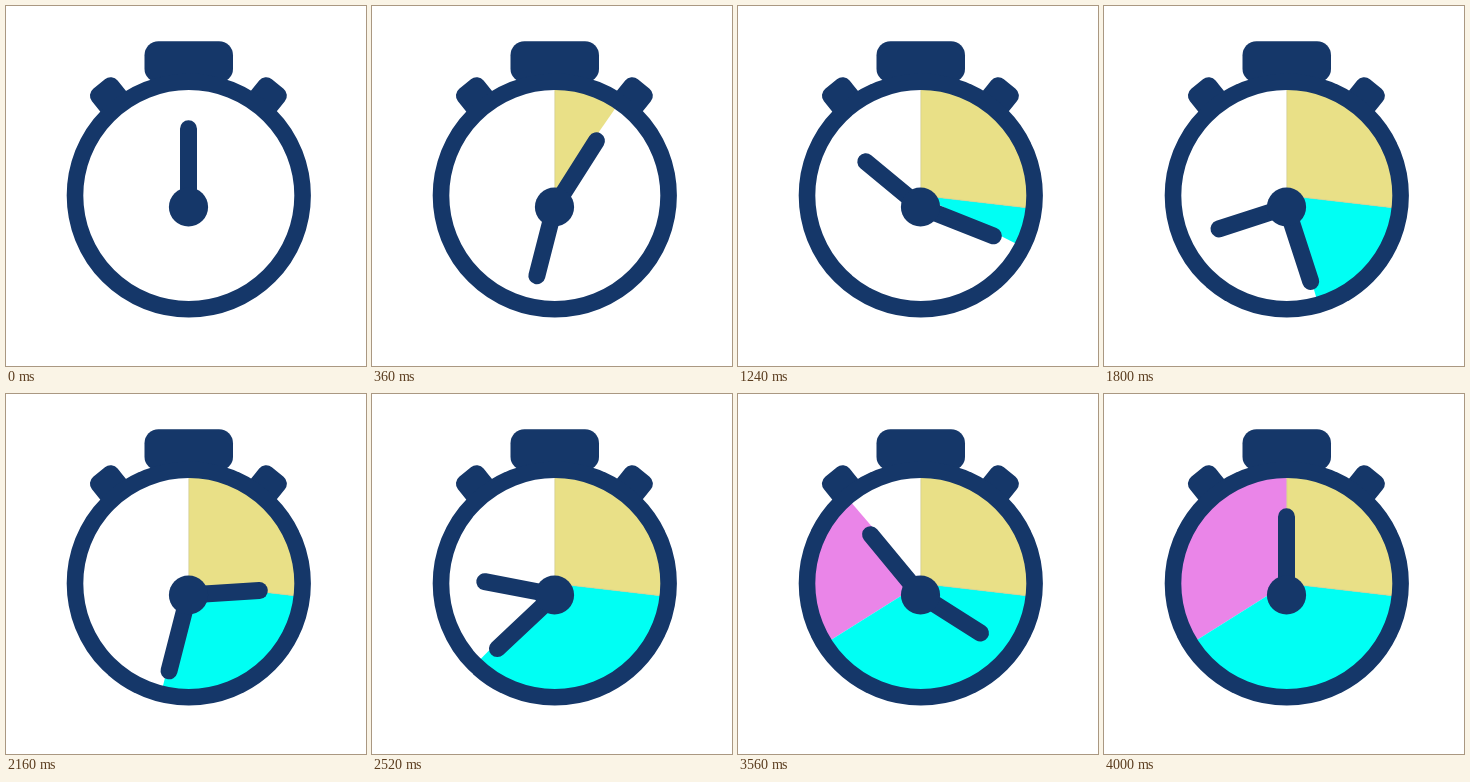
Recreate the animation shown at these times as an HTML page. Size 360 by 360 pixels, loop 4.08 s.

```html
<!DOCTYPE html>
<html lang="en">
<head>
<meta charset="utf-8">
<title>Stopwatch</title>
<style>
  html, body { margin: 0; width: 100%; height: 100%; overflow: hidden; background: #fff; }
  svg { display: block; width: 100vw; height: 100vh; }
  .navy { fill: #153769; }
  .hand { stroke: #153769; stroke-width: 17; stroke-linecap: round; }
</style>
</head>
<body>
<svg viewBox="0 0 360 360">
  <path id="pink" fill="#ea85e8"/>
  <path id="cyan" fill="#00fff4"/>
  <path id="yellow" fill="#e9e087"/>
  <path id="edge" fill="none" stroke="#c9c48f" stroke-width="0.8" stroke-opacity="0.7"/>
  <g class="navy">
    <rect x="138.5" y="35.2" width="88.5" height="41.5" rx="14"/>
    <rect x="-16.5" y="-17" width="33" height="34" rx="9" transform="translate(103.8 91.2) rotate(-39)"/>
    <rect x="-16.5" y="-17" width="33" height="34" rx="9" transform="translate(261 91.2) rotate(39)"/>
  </g>
  <circle cx="182.8" cy="189.5" r="113.8" fill="none" stroke="#153769" stroke-width="16.6"/>
  <g transform="translate(182.5 201)">
    <line id="fast" class="hand" y2="-71"/>
    <line id="slow" class="hand" y2="-78.3"/>
    <circle class="navy" r="19.6"/>
  </g>
</svg>
<script>
const STEP = 40, LAST_STEP = 100, LOOP = 4080;
const CX = 182.8, CY = 189.5, RADIUS = 108;

// Each sector opens from one angle to the next; "show" is when it becomes visible.
const sectors = [
  { id: "yellow", from: 0,     to: 96.6,  start: 0,    end: 1000, show: 0 },
  { id: "cyan",   from: 96.6,  to: 237.9, start: 1000, end: 2680, show: 1000 },
  { id: "pink",   from: 237.9, to: 360,   start: 2680, end: 4000, show: 3000 }
];

const byId = id => document.getElementById(id);
const clamp = x => Math.min(1, Math.max(0, x));

function rim(angle) {
  const a = angle * Math.PI / 180;
  return `${CX + RADIUS * Math.sin(a)} ${CY - RADIUS * Math.cos(a)}`;
}

function wedge(from, to) {
  if (to <= from) return "";
  return `M${CX} ${CY}L${rim(from)}A${RADIUS} ${RADIUS} 0 ${to - from > 180 ? 1 : 0} 1 ${rim(to)}Z`;
}

function render(time) {
  const step = Math.min(LAST_STEP, Math.floor((time % LOOP) / STEP));
  const t = step * STEP;
  const turn = step / LAST_STEP * 360;

  byId("slow").setAttribute("transform", `rotate(${turn})`);
  byId("fast").setAttribute("transform", `rotate(${turn * 6})`);

  for (const s of sectors) {
    const p = t < s.show ? 0 : clamp((t - s.start) / (s.end - s.start));
    byId(s.id).setAttribute("d", wedge(s.from, s.from + (s.to - s.from) * p));
  }

  let edge = t > 0 ? `M${CX} ${CY}L${rim(0)}` : "";
  if (t >= 1000) edge += `M${CX} ${CY}L${rim(96.6)}`;
  byId("edge").setAttribute("d", edge);
}

const begin = performance.now();
function tick() {
  render(performance.now() - begin);
  requestAnimationFrame(tick);
}
tick();
</script>
</body>
</html>
```
